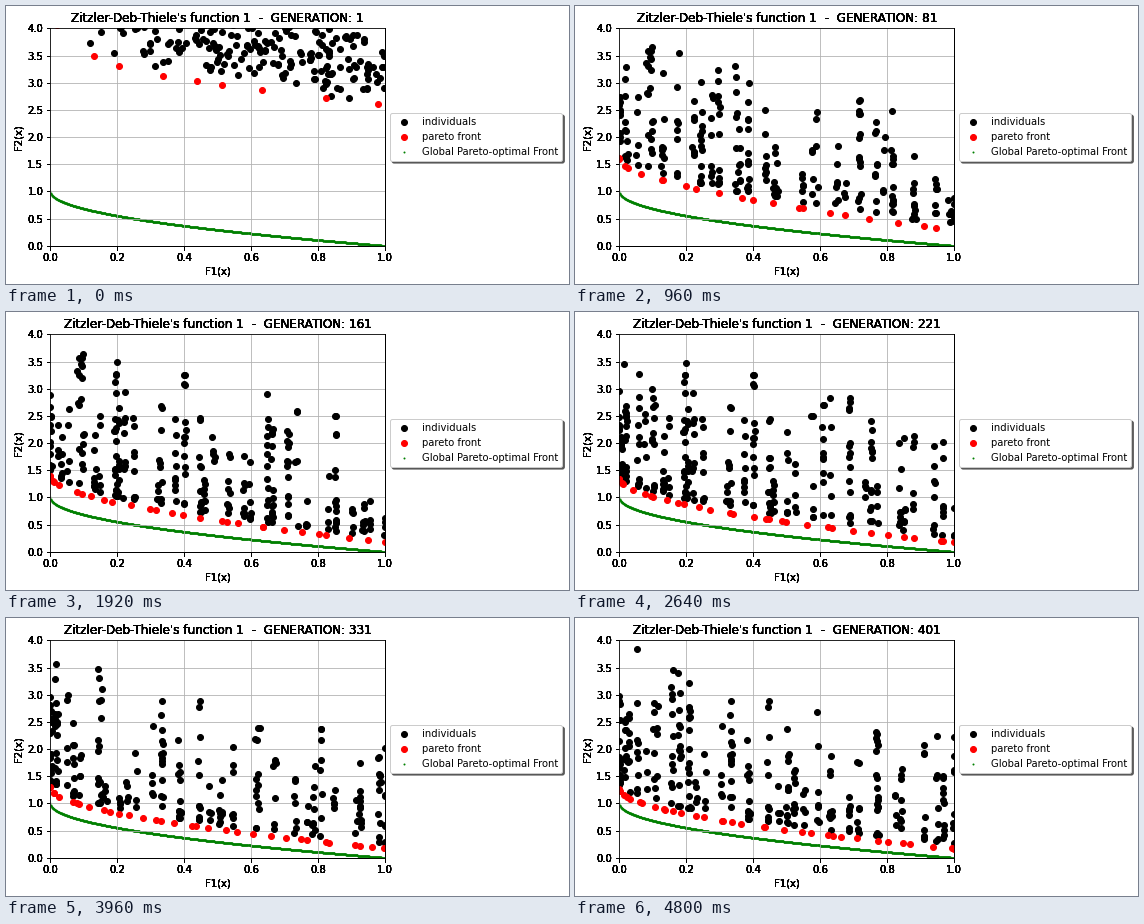
A matplotlib script for the animation above (4.92 s loop, 563 by 278 pixels).

```python
import numpy as np
import matplotlib.pyplot as plt
from matplotlib.animation import FuncAnimation

W, H, DPI = 563, 278, 72
FRAMES, INTERVAL, STEP = 41, 120, 10
LAYERS = 8       # stacked labels give the text its heavy edges
COLUMNS = 34
SETTLE = 70      # generations until the first population is gone
GOLDEN = (5 ** .5 - 1) / 2


def ideal(x):
    return 1 - np.sqrt(x)


def front(gen, x):
    """Best values found so far; the gap to the ideal decays."""
    age = gen - 1
    left = .2 + .35 * np.exp(-age / 250) + 2.2 * np.exp(-age / 30)
    right = .17 + 2.43 * np.exp(-age / 26)
    start = .6 * np.exp(-age / 12 - x / .08)
    return ideal(x) + left + (right - left) * x + start


def slot_rng(slot, gen, life, kind):
    """Generator that stays the same for one lifetime of a slot."""
    epoch = int(gen / life + slot * GOLDEN)
    return np.random.default_rng([kind, slot, epoch])


def spread(slot, rng, power):
    """Evenly scattered position, denser towards zero."""
    u = slot * GOLDEN % 1 + rng.uniform(-.02, .02)
    return np.clip(1.08 * u - .04, 0, 1) ** power


def first_population(size=300):
    """Uniform random genes put through the ZDT1 formula."""
    rng = np.random.default_rng(1)
    genes = rng.random((size, 30))
    x = genes[:, 0]
    g = 1 + 9 * genes[:, 1:].mean(axis=1)
    above = g - np.sqrt(x * g) - front(1, x)
    keep = above > .05
    return x[keep], above[keep], SETTLE * rng.random(keep.sum())


def column(slot, gen):
    """Individuals that share one gene, densest near the front."""
    rng = slot_rng(slot, gen, 90, 0)
    x = spread(slot, rng, 1.25)
    low = front(gen, x) + .1
    room = max(3.95 - 1.6 * x - low, .4)
    height = room * rng.random() ** .6
    n = int((2 + 4 * height) * rng.uniform(.4, 1.5)) + 1
    rise = height * rng.random(n) ** 1.5
    rise[0] = height
    return np.c_[np.clip(x + rng.normal(0, .002, n), 0, 1), low + rise]


def population(gen):
    x, above, death = first
    alive = death > gen - 1
    cloud = np.c_[x, front(gen, x) + above][alive]
    grown = [column(k, gen) for k in range(COLUMNS) if births[k] < gen - 1]
    return np.vstack([cloud, *grown])


def pareto(gen):
    n = int(10 + 26 * (1 - np.exp(-(gen - 1) / 130)))
    x = np.array([spread(k, slot_rng(k, gen, 70, 1), 1.4) for k in range(n)])
    return np.c_[x, front(gen, x)]


first = first_population()
births = SETTLE * np.random.default_rng(2).random(COLUMNS)

plt.rcParams["font.family"] = "DejaVu Sans"
fig = plt.figure(figsize=((W + .001) / DPI, (H + .001) / DPI), dpi=DPI,
                 facecolor="white")
rect = [44.3 / W, 38.2 / H, 334.8 / W, 217.44 / H]
layers = [fig.add_axes(rect, label=str(i)) for i in range(LAYERS)]
for ax in layers:
    ax.set(xlim=(0, 1), ylim=(0, 4), xlabel="F1(x)", ylabel="F2(x)",
           xticks=np.arange(0, 1.1, .2), yticks=np.arange(0, 4.1, .5))

top = layers[-1]
curve = np.linspace(0, 1, 1001)
people, = top.plot([], [], "o", color="black", label="individuals")
best, = top.plot([], [], "o", color="red", label="pareto front")
top.scatter(curve, ideal(curve), s=1, color="green",
            label="Global Pareto-optimal Front")
top.grid(True)
top.legend(loc="center left", bbox_to_anchor=(1, .5), fancybox=True,
           framealpha=1, shadow={"alpha": .9})


def update(frame):
    gen = 1 + STEP * frame
    people.set_data(*population(gen).T)
    best.set_data(*pareto(gen).T)
    for ax in layers:
        ax.set_title(f"Zitzler-Deb-Thiele's function 1  -  GENERATION: {gen}")


anim = FuncAnimation(fig, update, frames=FRAMES, interval=INTERVAL,
                     init_func=lambda: update(0), repeat=True, repeat_delay=0)
plt.show()
```
